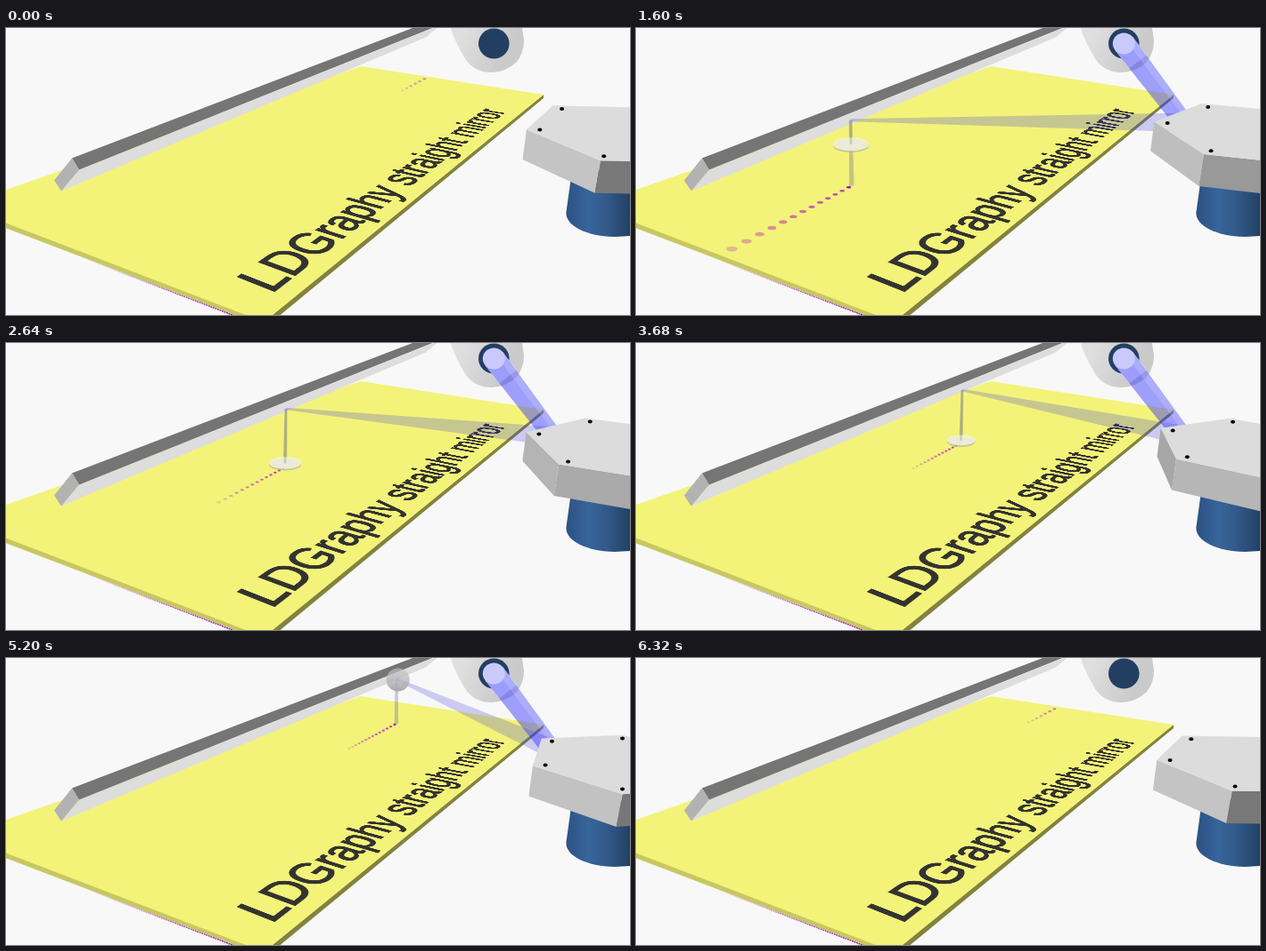
An HTML page with a canvas for the animation above (6.4 s loop, 700 by 323 pixels).

```html
<!DOCTYPE html>
<html lang="en">
<head>
<meta charset="utf-8">
<title>Straight mirror scanner</title>
<style>
html, body { margin: 0; width: 100%; height: 100%; overflow: hidden; background: #f8f8f8; }
#stage { position: relative; width: 700px; height: 323px; overflow: hidden; }
#stage > * { position: absolute; left: 0; top: 0; }
#label {
  font: 100px/100px "Liberation Sans", Arial, sans-serif;
  white-space: pre; color: #333330; transform-origin: 0 0;
  -webkit-text-stroke: 3px #333330;
}
</style>
</head>
<body>
<div id="stage">
  <svg width="700" height="323" viewBox="0 0 700 323">
    <defs>
      <linearGradient id="motor" gradientUnits="userSpaceOnUse" x1="628" x2="712" y1="0" y2="0">
        <stop offset="0" stop-color="#2b5183"/>
        <stop offset=".3" stop-color="#38659a"/>
        <stop offset=".55" stop-color="#32598a"/>
        <stop offset="1" stop-color="#1b3552"/>
      </linearGradient>
      <linearGradient id="housing" gradientUnits="userSpaceOnUse" x1="510" x2="562" y1="8" y2="32">
        <stop offset="0" stop-color="#dfdfdf"/>
        <stop offset="1" stop-color="#cacaca"/>
      </linearGradient>
      <linearGradient id="exposed" gradientUnits="userSpaceOnUse" x1="90" x2="250" y1="0" y2="0">
        <stop offset="0" stop-color="#a010c0" stop-opacity="0"/>
        <stop offset=".6" stop-color="#a010c0" stop-opacity=".7"/>
        <stop offset="1" stop-color="#a010c0"/>
      </linearGradient>
    </defs>
    <!-- board -->
    <path d="M0 225.5L257 324" stroke="url(#exposed)" stroke-width="1.7" stroke-dasharray="2 .7"/>
    <path d="M0 218L290 330V336L0 225.3Z" fill="#c7c762"/>
    <path d="M603 75V79L304 326L289 331Z" fill="#83833d"/>
    <path d="M0 182L398 43L603 75L289.4 330.8L0 219.4Z" fill="#f3f37a"/>
    <!-- straight mirror -->
    <g transform="translate(0 -.5)">
      <path d="M82 160L481 0H484L471 11L62 184Z" fill="#dddddd"/>
      <path d="M74 147L460 -1H482L82 160Z" fill="#757575"/>
      <path d="M74 147L82 160L62 184L54 172Z" fill="#b2b2b2"/>
    </g>
    <!-- laser -->
    <path d="M499 0Q502 13 516 36Q526 50 545 50Q562 49 573 38Q581 28 581 14L579 0Z" fill="url(#housing)"/>
    <ellipse cx="547.3" cy="17.5" rx="17.3" ry="17" fill="#223f63"/>
    <path d="M635 160L628.5 207C627 221 648 234 683 235L701 234V160Z" fill="url(#motor)"/>
  </svg>
  <div id="label">LDGraphy straight mirror</div>
  <canvas id="view" width="700" height="323"></canvas>
</div>
<script>
const STEP = 80, COUNT = 80, FIRST = 8, LAST = 72, TRAIL = 13;
const ctx = document.getElementById('view').getContext('2d');
const rad = d => d * Math.PI / 180;
const mix = (p, q, k) => [p[0] + (q[0] - p[0]) * k, p[1] + (q[1] - p[1]) * k];

// Maps a w by h box onto a quad: top left, top right, bottom right, bottom left.
function quadMatrix(w, h, [p, q, r, s]) {
  const sx = p[0] - q[0] + r[0] - s[0], sy = p[1] - q[1] + r[1] - s[1];
  const ax = q[0] - r[0], ay = q[1] - r[1], bx = s[0] - r[0], by = s[1] - r[1];
  const det = ax * by - bx * ay;
  const g = (sx * by - bx * sy) / det, k = (ax * sy - sx * ay) / det;
  const col = (u, v, f, n) => [(u[0] - v[0] + f * u[0]) / n, (u[1] - v[1] + f * u[1]) / n, 0, f / n];
  return `matrix3d(${[...col(q, p, g, w), ...col(s, p, k, h), 0, 0, 1, 0, p[0], p[1], 0, 1]})`;
}

// The box spans cap height to baseline of the 100px label.
document.getElementById('label').style.transform =
  quadMatrix(1100, 69, [[256.5, 282.5], [532, 89.5], [561, 94], [297.5, 299]]) + ' translateY(-15.8px)';

function poly(points, fill) {
  ctx.beginPath();
  points.forEach(p => ctx.lineTo(p[0], p[1]));
  ctx.closePath();
  ctx.fillStyle = fill;
  ctx.fill();
}

function oval(x, y, rx, ry, fill, turn = 0) {
  ctx.beginPath();
  ctx.ellipse(x, y, rx, ry, turn, 0, 2 * Math.PI);
  ctx.fillStyle = fill;
  ctx.fill();
}

// Beam between two points with a half width at each end.
function beam(p, q, hp, hq, fill) {
  const dx = q[0] - p[0], dy = q[1] - p[1], len = Math.hypot(dx, dy);
  const nx = -dy / len, ny = dx / len;
  poly([[p[0] + nx * hp, p[1] + ny * hp], [q[0] + nx * hq, q[1] + ny * hq],
        [q[0] - nx * hq, q[1] - ny * hq], [p[0] - nx * hp, p[1] - ny * hp]], fill);
}

// The reflected ray turns 1.5 degrees per step.
const sweep = n => 1.5 * (n - 40);
const along = (n, a, b, c) => {
  const t = Math.tan(rad(sweep(n)));
  return (a + b * t) / (1 + c * t);
};
function onBar(n) {
  const x = along(n, 343.2, 243.2, .2731);
  return [x, 152 - .406 * (x - 122)];
}
function onBoard(n) {
  const x = along(n, 340.1, 236.9, .2567);
  return [x, 240 - .529 * (x - 124)];
}
const pitch = n => onBoard(n + .5)[0] - onBoard(n - .5)[0];

function drawTrail(n) {
  for (let age = TRAIL; age >= 0; age--) {
    const m = (n - age + COUNT) % COUNT;
    if (m < FIRST || m > LAST) continue;
    const [x, y] = onBoard(m), rx = Math.max(1.7, .38 * pitch(m));
    const alpha = .9 * Math.pow(1 - age / 14, .6);
    oval(x, y, rx, Math.max(1.1, .44 * rx), age ? `rgba(186,36,190,${alpha})` : '#a000dc');
  }
}

// The lens keeps a fixed path length from the rotating mirror.
function drawLens(n, start, hit, ground) {
  const reach = 1 / Math.cos(rad(sweep(n))), path = 1.2457;
  const r = 22 - .16 * (n - 9);
  if (path > reach) {
    const [x, y] = mix(hit, ground, (path - reach) / .246);
    oval(x, y + 1.2, r, r * .38, 'rgba(185,185,150,.75)');
    oval(x, y - .3, r, r * .37, 'rgba(243,243,226,.85)');
    beam(hit, [x, y], 1, 1.3, 'rgba(110,110,120,.25)');
    return;
  }
  const f = path / reach, skew = 1 - .15 * Math.tan(rad(sweep(n)));
  const [x, y] = mix(start, hit, f / (f + (1 - f) * skew));
  const thin = r * Math.sin(rad(5 + 1.5 * (n - 9)));
  const shade = ctx.createLinearGradient(0, y - r, 0, y + r);
  const near = n < 40;
  shade.addColorStop(0, near ? 'rgba(245,245,245,.9)' : 'rgba(200,200,203,.6)');
  shade.addColorStop(1, near ? 'rgba(125,125,90,.8)' : 'rgba(160,160,163,.9)');
  oval(x, y, thin, r, shade, near ? rad(-6) : 0);
}

function drawBeams(n) {
  const start = [605, 108 - 9 * (n - 9) / 56];
  const hit = onBar(n), ground = onBoard(n + .45);
  const wide = .8 + .15 * pitch(n);
  beam(hit, start, 1 + .07 * pitch(n), 10.5, 'rgba(55,55,225,.23)');
  beam(hit, ground, wide, wide + .8, 'rgba(50,50,150,.25)');
  drawLens(n, start, hit, ground);
  beam([547.3, 17.5], [563, 38], 12.5, 12.2, '#f4f4f8');
  beam([547.3, 17.5], [609, 99], 12.5, 10.5, 'rgba(50,50,255,.45)');
  beam([554, 13], [614, 94], 4, 3.5, 'rgba(255,255,255,.16)');
  oval(547.3, 17.5, 12.5, 12, '#c9c9fb');
}

// Rotating mirror: point at radius r and angle deg, lowered by drop.
function spin(r, deg, drop = 0) {
  const c = r * Math.cos(rad(deg)), s = r * Math.sin(rad(deg));
  const d = 1 - .0914 * c + .0293 * s, w = d + drop;
  return [(691.5 * d - 97.75 * s + drop * 320) / w,
          (116.4 + 17.7 * c - 8.2 * s + drop * 2150) / w];
}

function drawPolygon(n) {
  const angles = [0, 1, 2, 3, 4, 5].map(i => 60 * i + 11.25 + .75 * n);
  for (const a of angles) {
    const p = spin(1.16, a), q = spin(1.16, a + 60);
    const p2 = spin(1.16, a, .0168), q2 = spin(1.16, a + 60, .0168);
    if ((q[0] - p[0]) * (p2[1] - p[1]) - (q[1] - p[1]) * (p2[0] - p[0]) >= 0) continue;
    const g = Math.round(196 * (.21 + .79 * Math.max(.5, Math.cos(rad(a - 10)))));
    poly([p, q, q2, p2], `rgb(${g},${g},${g})`);
  }
  poly(angles.map(a => spin(1.16, a)), '#dcdcdc');
  for (const a of angles) {
    const [x, y] = spin(1, a);
    oval(x, y, 2.5, 2, '#050505');
  }
}

function draw(now) {
  const n = Math.floor(now / STEP) % COUNT;
  ctx.clearRect(0, 0, 700, 323);
  drawTrail(n);
  if (n >= FIRST && n <= LAST) drawBeams(n);
  drawPolygon(n);
}

let origin;
function tick(now) {
  origin ??= now;
  draw(now - origin);
  requestAnimationFrame(tick);
}
draw(0);
requestAnimationFrame(tick);
</script>
</body>
</html>
```
